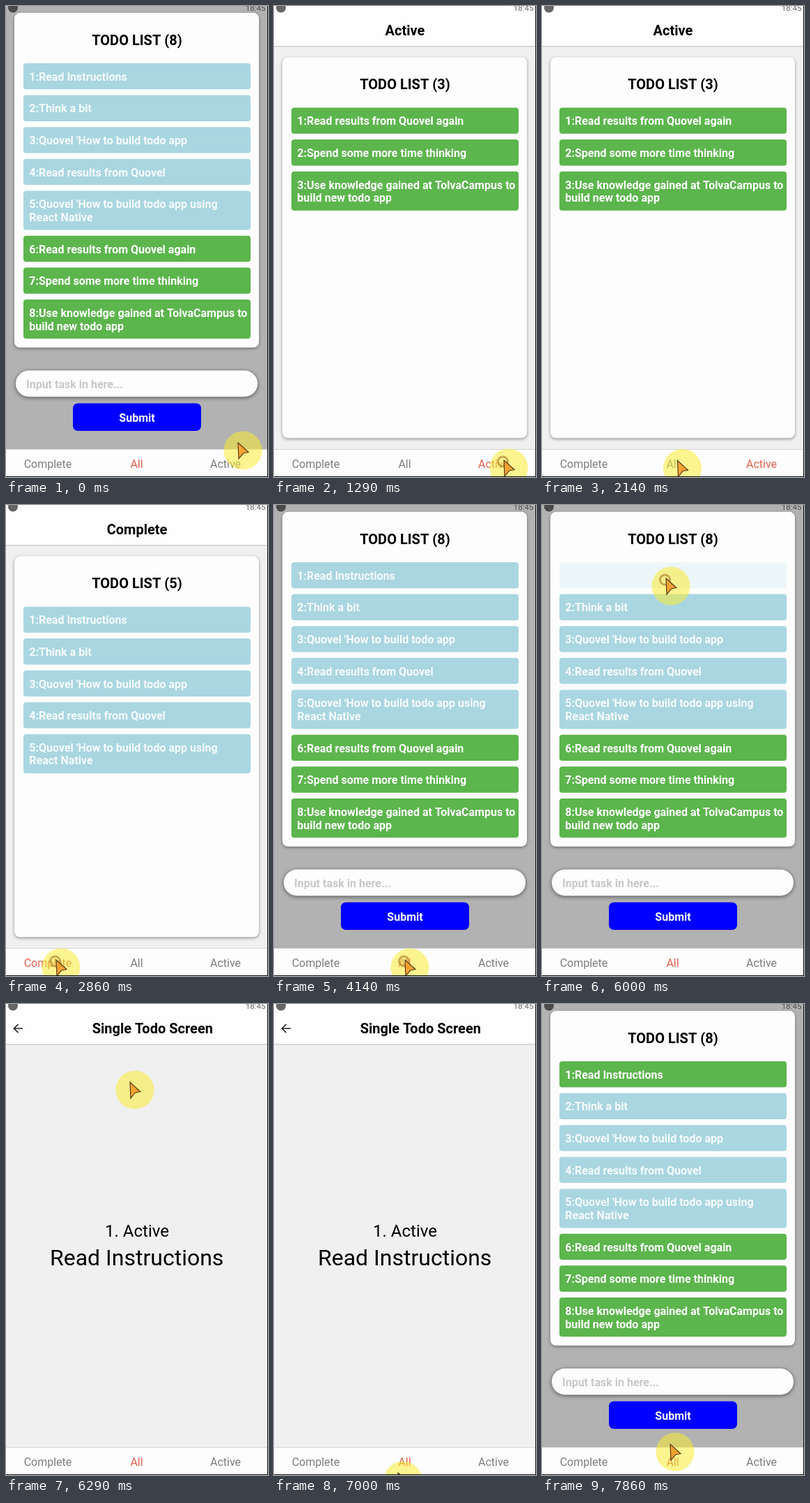
Write an HTML page with a canvas that moves like this. It is 376x674 px and loops after 8000 ms.

```html
<!DOCTYPE html>
<html lang="en">
<head>
<meta charset="utf-8">
<title>Todo app</title>
<style>
html, body { margin: 0; width: 100%; height: 100%; overflow: hidden; }
canvas { display: block; }
</style>
</head>
<body>
<canvas id="stage" width="376" height="674"></canvas>
<script>
const ctx = document.getElementById('stage').getContext('2d');
const LOOP = 8000;
const BLUE = '#a9d6e1', GREEN = '#5cb54d', RED = '#e5604d', GREY = '#7d7d7d';

const tasks = [
  ['Read Instructions'],
  ['Think a bit'],
  ["Quovel 'How to build todo app"],
  ['Read results from Quovel'],
  ["Quovel 'How to build todo app using", 'React Native'],
  ['Read results from Quovel again'],
  ['Spend some more time thinking'],
  ['Use knowledge gained at TolvaCampus to', 'build new todo app']
];

// Start time and name of each screen
const screens = [[0, 'All'], [1285, 'Active'], [2850, 'Complete'], [4130, 'All'], [6280, 'Single'], [7850, 'All']];

// Pointer stops: time, x, y
const path = [
  [0, 340, 636], [150, 340, 636], [900, 337, 661], [1650, 337, 661],
  [2600, 79, 662], [3250, 79, 662], [3950, 195, 662], [4350, 195, 662],
  [5650, 185, 116], [6250, 185, 116], [6860, 180, 653], [7000, 185, 682],
  [7560, 197, 690], [7849, 197, 690], [7850, 191, 641], [LOOP, 191, 641]
];
const presses = [[1230, 1500], [2800, 3060], [4080, 4320], [5800, 6100]];

const clamp = v => Math.max(0, Math.min(1, v));
const ease = v => v * v * (3 - 2 * v);

function text(s, x, y, size, color, weight = 400, align = 'center') {
  ctx.font = `${weight} ${size}px Roboto, sans-serif`;
  ctx.fillStyle = color;
  ctx.textAlign = align;
  ctx.fillText(s, x, y);
}

function rect(x, y, w, h, color) {
  ctx.fillStyle = color;
  ctx.fillRect(x, y, w, h);
}

function box(x, y, w, h, r, color, shadow = 0) {
  ctx.save();
  if (shadow) {
    ctx.shadowColor = 'rgba(0,0,0,.4)';
    ctx.shadowBlur = shadow;
    ctx.shadowOffsetY = 1.5;
  }
  ctx.fillStyle = color;
  ctx.beginPath();
  ctx.roundRect(x, y, w, h, r);
  ctx.fill();
  ctx.restore();
}

function disc(x, y, r, color) {
  ctx.fillStyle = color;
  ctx.beginPath();
  ctx.arc(x, y, r, 0, 7);
  ctx.fill();
}

function header(title, x) {
  rect(0, 0, 376, 57, '#fefefe');
  rect(0, 57, 376, 1, '#cfcfcf');
  rect(0, 58, 376, 1, '#e3e3e3');
  text(title, x, 42, 20, '#000', 700);
}

// items: [task lines, done]
function list(items, top, height, firstAlpha) {
  box(12, top, 351, height, 8, '#fdfdfd', 4);
  text(`TODO LIST (${items.length})`, 188, top + 46, 20, '#000', 700);
  let y = top + 72.2;
  items.forEach(([lines, done], i) => {
    const h = 37.3 + 18.75 * (lines.length - 1);
    ctx.globalAlpha = i ? 1 : firstAlpha;
    box(25, y, 326, h, 4, done ? BLUE : GREEN);
    lines.forEach((line, k) =>
      text((k ? '' : i + 1 + ':') + line, 33.3, y + 24.8 + 18.75 * k, 16, done ? '#f6fbfc' : '#fff', 700, 'left'));
    ctx.globalAlpha = 1;
    y += h + 8.3;
  });
}

function allScreen(items, firstAlpha) {
  rect(0, 0, 376, 674, '#b2b2b2');
  list(items, 9.8, 479, firstAlpha);
  box(13, 520.5, 349, 39.5, 20, '#8f8f8f', 5);
  box(14, 521.5, 347, 37.5, 19, '#fdfdfd');
  text('Input task in here...', 29, 547, 16, '#c8c8cb', 700, 'left');
  box(96, 568.5, 184, 39.5, 7, '#0000fe');
  text('Submit', 188, 594.7, 16, '#fff', 700);
}

function singleScreen() {
  header('Single Todo Screen', 210.3);
  ctx.strokeStyle = '#222';
  ctx.lineWidth = 1.7;
  ctx.stroke(new Path2D('M24 35H12M17.5 29L11.5 35L17.5 41'));
  text('1. Active', 188, 333, 24, '#000');
  text('Read Instructions', 187.7, 374, 32, '#000');
}

function tabs(active) {
  rect(0, 634, 376, 40, '#fdfdfd');
  rect(0, 634, 376, 1, '#d4d4d4');
  [['Complete', 60], ['All', 187.5], ['Active', 315]].forEach(([name, x]) =>
    text(name, x, 661, 16, name === active ? RED : GREY));
}

function pointer(t) {
  const i = path.findIndex(p => p[0] > t);
  const [t0, x0, y0] = path[i - 1], [t1, x1, y1] = path[i];
  const k = ease(clamp((t - t0) / (t1 - t0)));
  const x = x0 + (x1 - x0) * k, y = y0 + (y1 - y0) * k;
  disc(x, y, 27.5, 'rgba(250,236,50,.54)');
  if (presses.some(([a, b]) => t >= a && t < b)) {
    ctx.strokeStyle = 'rgba(165,105,30,.55)';
    ctx.lineWidth = 3;
    ctx.beginPath();
    ctx.arc(x - 8.5, y - 9, 7, 0, 7);
    ctx.stroke();
  }
  ctx.save();
  ctx.translate(x - 7, y - 11);
  const arrow = new Path2D('M0 0L15 13.5L7.5 15L1 23Z');
  ctx.fillStyle = '#f6a233';
  ctx.fill(arrow);
  ctx.strokeStyle = '#59401c';
  ctx.lineWidth = 1.2;
  ctx.stroke(arrow);
  ctx.restore();
}

function draw(t) {
  const screen = screens.filter(s => s[0] <= t).pop()[1];
  const items = tasks.map((lines, i) => [lines, i < 5 && (i > 0 || t < 6280)]);
  rect(0, 0, 376, 674, '#f0f0f0');
  if (screen === 'All') {
    const fade = t < 6280 ? 1 - 0.8 * clamp((t - 5800) / 150) : 1;
    allScreen(items, fade);
  } else if (screen === 'Single') {
    singleScreen();
  } else {
    header(screen, 188);
    list(items.filter(item => item[1] === (screen === 'Complete')), 73.3, 545, 1);
  }
  tabs(screen === 'Single' ? 'All' : screen);

  const ink = screen === 'All' ? '#4a4a4a' : '#666';
  disc(10, 2.5, 7, ink);
  text('18:45', 372.5, 7, 11.5, ink, 400, 'right');
  pointer(t);
  rect(375, 0, 1, 674, '#111');
  rect(0, 673, 376, 1, '#111');
}

function tick() {
  draw(performance.now() % LOOP);
  requestAnimationFrame(tick);
}
tick();
</script>
</body>
</html>
```
